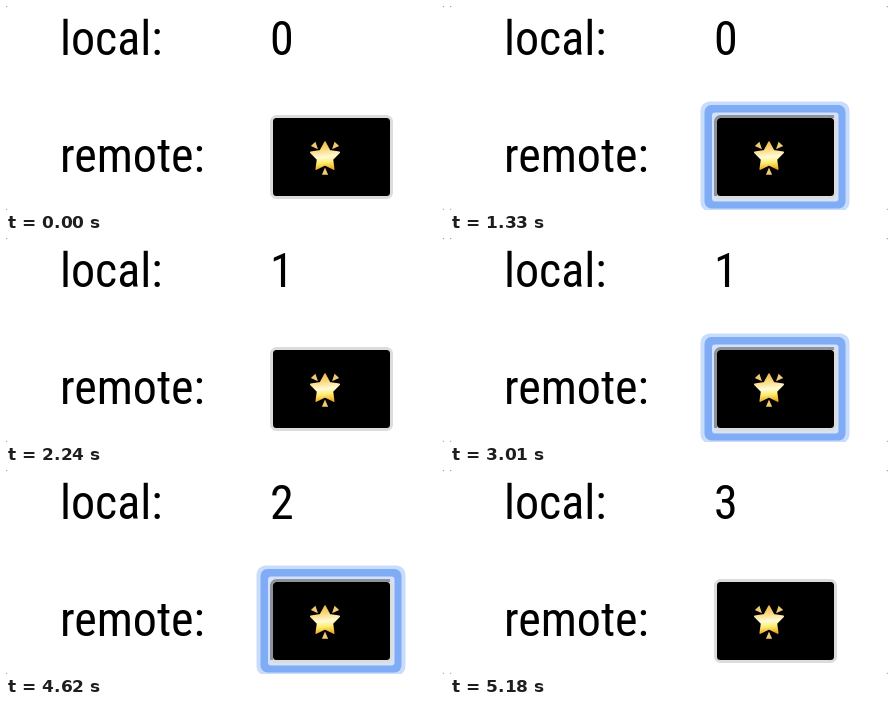
An HTML page that plays this animation: 438 px wide and 204 px high, repeating every 6440 ms.

```html
<!DOCTYPE html>
<html lang="en">
<head>
<meta charset="utf-8">
<title>Local and remote counter</title>
<style>
html, body { margin: 0; width: 100%; height: 100%; overflow: hidden; background: #fff; }
svg { display: block; width: 438px; height: 204px; }
text {
  font: 400 48px "Roboto Condensed", Roboto, sans-serif;
  font-stretch: 75%;
  fill: #000;
}
</style>
</head>
<body>
<svg viewBox="0 0 438 204">
  <defs>
    <linearGradient id="gold" x1="0.45" y1="0" x2="0.55" y2="1">
      <stop offset="0" stop-color="#f0b94a"/>
      <stop offset="0.3" stop-color="#fbdc84"/>
      <stop offset="0.55" stop-color="#fffbd8"/>
      <stop offset="0.75" stop-color="#ffee70"/>
      <stop offset="1" stop-color="#eda823"/>
    </linearGradient>
  </defs>
  <rect width="438" height="204" fill="#999"/>
  <rect width="438" height="204" rx="2.5" fill="#fff"/>
  <text x="54" y="49">local:</text>
  <text id="count" x="264" y="49">0</text>
  <text x="54" y="166.300">remote:</text>
  <g id="ring">
    <rect x="250.500" y="95.500" width="149" height="110" rx="9" fill="#c8ddfb"/>
    <rect x="254.500" y="99" width="141" height="103.500" rx="7" fill="#80abf5"/>
    <rect x="262" y="106.500" width="126.500" height="89" rx="3" fill="#d3e2fa"/>
  </g>
  <rect id="edge" x="265.500" y="110.500" width="120" height="81" rx="5" stroke="#dcdcdc" stroke-width="3"/>
  <path id="bevel" d="M265.500 190V115.500a5 5 0 0 1 5-5H384" fill="none" stroke="#8d929c" stroke-width="3"/>
  <g id="star">
    <g id="rays" fill="#f0c873"/>
    <path id="body" fill="url(#gold)" stroke="url(#gold)" stroke-width="1.500" stroke-linejoin="round"/>
  </g>
</svg>
<script>
const LOOP = 6440, HOLD = 140, FADE_STEP = 70;
const $ = id => document.getElementById(id);
const clicks = [
  { down: 1330, fades: 1, counted: 2240 },
  { down: 3010, fades: 1, counted: 3430 },
  { down: 4620, fades: 2, counted: 5180 }
];

function polar(cx, cy, r, deg) {
  const a = deg * Math.PI / 180;
  return `${(cx + r * Math.sin(a)).toFixed(2)} ${(cy - r * Math.cos(a)).toFixed(2)}`;
}

function drawStar(cx, cy, outer, inner) {
  const points = Array.from({ length: 10 }, (_, i) => polar(cx, cy, i % 2 ? inner : outer, i * 36));
  $("body").setAttribute("d", `M${points.join("L")}Z`);
  $("rays").innerHTML = [-42, 42, 180].map(a =>
    `<path d="M${polar(cx, cy, 10.5, a)}L${polar(cx, cy, 18, a - 10)}L${polar(cx, cy, 18, a + 10)}Z"/>`
  ).join("");
}

function ringAlpha(t) {
  for (const { down, fades } of clicks) {
    const since = t - down;
    if (since < 0 || since >= HOLD + fades * FADE_STEP) continue;
    if (since < HOLD) return 1;
    const step = Math.floor((since - HOLD) / FADE_STEP) + 1;
    return 1 - step / (fades + 1);
  }
  return 0;
}

function render(t) {
  const alpha = ringAlpha(t);
  $("count").textContent = clicks.filter(c => t >= c.counted).length;
  $("ring").setAttribute("opacity", alpha);
  $("bevel").setAttribute("opacity", alpha ? 1 : 0);
}

drawStar(319, 151, 15, 7.8);
const start = performance.now();
function tick() {
  render((performance.now() - start) % LOOP);
  requestAnimationFrame(tick);
}
tick();
</script>
</body>
</html>
```
